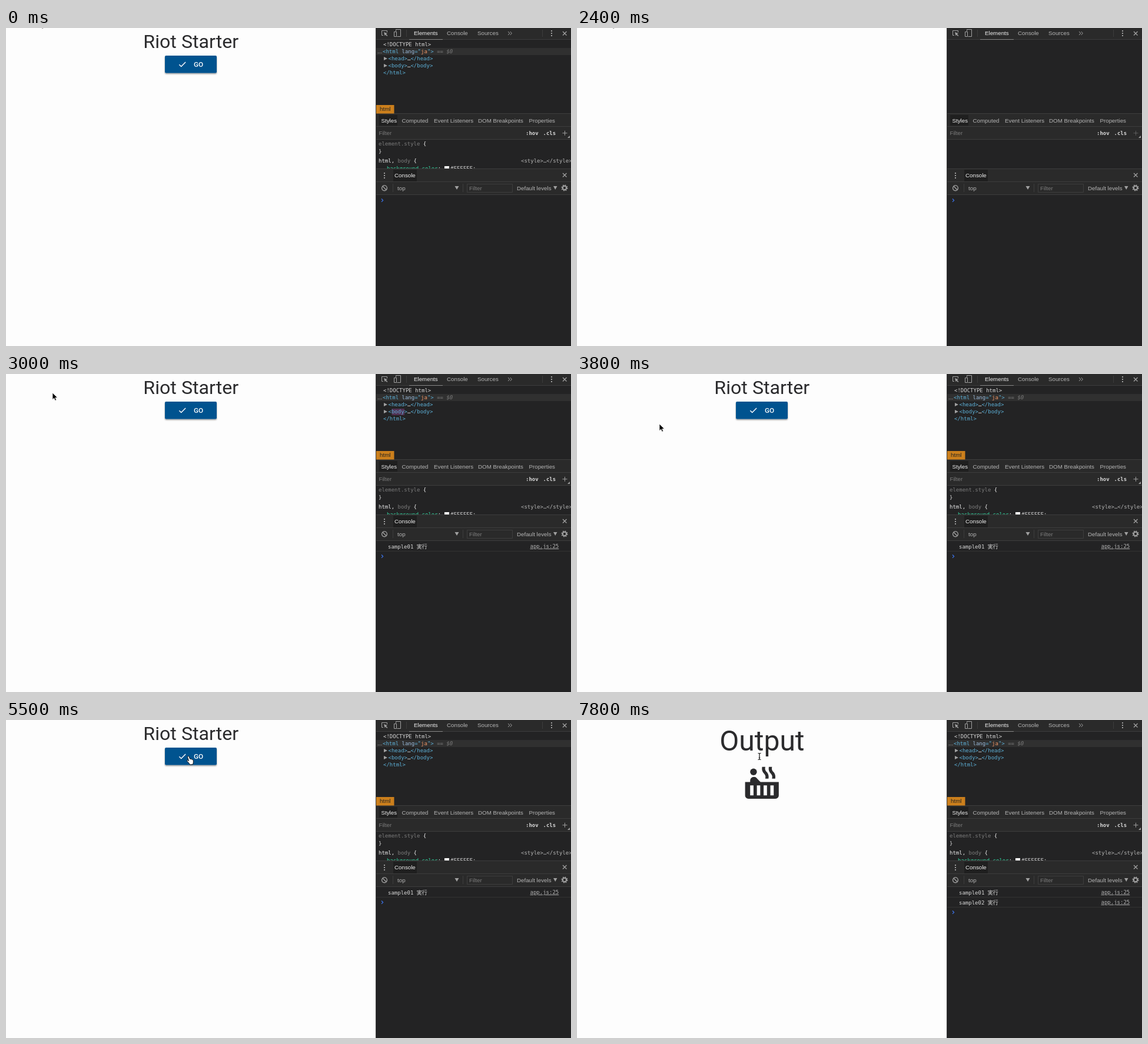
Animation, 960 px wide and 541 px high, one loop 8 s. Source, as an HTML page:

```html
<!DOCTYPE html>
<html lang="en">
<head>
<meta charset="utf-8">
<title>Riot Starter</title>
<style>
html, body { margin: 0; width: 100%; height: 100%; overflow: hidden; background: #fdfdfd; }
svg { display: block; width: 960px; height: 541px; }
text { white-space: pre; }
.title { font-family: Roboto, sans-serif; text-anchor: middle; }
.ui { font: 9.75px "Liberation Sans", Arial, sans-serif; fill: #b4b4b4; }
.code { font: 9px "DejaVu Sans Mono", "Noto Sans CJK JP", "Noto Sans CJK", monospace; fill: #d8d8d8; }
.on { fill: #eee; }
.dim { fill: #7c7c7c; }
.tag { fill: #5db0d7; }
.attr { fill: #9bbbdc; }
.val { fill: #f29766; }
.prop { fill: #35d4a0; }
.bold { font-weight: bold; }
.link { text-decoration: underline; fill: #b4b4b4; }
.line { stroke: #3d3d3d; fill: none; }
.icon { stroke: #a0a0a0; fill: none; }
.prompt { stroke: #3b6fe0; stroke-width: 1.3; fill: none; }
.arrow { fill: #a0a0a0; }
.bar { fill: #2a2a2a; }
.well { fill: #1f1f1f; }
.ink { fill: #2b2b2d; }
</style>
</head>
<body>
<svg viewBox="0 0 960 541">
  <defs>
    <clipPath id="buttonClip"><rect x="270" y="47" width="88" height="29.5" rx="2"/></clipPath>
    <clipPath id="stylesClip"><rect x="629" y="190" width="331" height="49"/></clipPath>
    <filter id="shadow" x="-20%" y="-30%" width="140%" height="190%">
      <feDropShadow dx="0" dy="1.5" stdDeviation="1.3" flood-color="#000" flood-opacity=".45"/>
    </filter>
  </defs>
  <rect width="960" height="541" fill="#fdfdfd"/>

  <g id="home">
    <text class="title ink" x="314.3" y="34" font-size="32.2">Riot Starter</text>
    <rect x="270" y="47" width="88" height="29.5" rx="2" fill="#02528f" filter="url(#shadow)"/>
    <g clip-path="url(#buttonClip)"><circle id="ripple" cx="311" cy="64" fill="#3069a4"/></g>
    <path d="M294.3 62.2l3.4 3.4 7.4-7.6" fill="none" stroke="#fff" stroke-width="1.4"/>
    <text x="319" y="66" font-family="Roboto, sans-serif" font-size="11.8" font-weight="500" fill="#fff">GO</text>
  </g>

  <g id="output" class="ink">
    <text class="title" x="314.4" y="52" font-size="48">Output</text>
    <g transform="translate(279.9 71.1) scale(2.86)">
      <circle cx="7" cy="6" r="2"/>
      <path fill-rule="evenodd" d="M11.15 12c-.31-.22-.59-.46-.82-.72l-1.4-1.55c-.4-.45-1-.73-1.68-.73C6.01 9 5 10.01 5 11.25V12H2v8c0 1.1.9 2 2 2h16c1.1 0 2-.9 2-2v-8zM5 14h2v6H5zm4 0h2v6H9zm4 0h2v6h-2zm4 0h2v6h-2z"/>
      <path id="steam" d="M18.65 5.86l-.07-.07c-.57-.62-.82-1.41-.67-2.2L18 3h-1.89l-.06.43c-.2 1.36.27 2.71 1.3 3.72l.07.06c.57.62.82 1.41.67 2.2l-.11.59h1.91l.06-.43c.21-1.36-.27-2.71-1.3-3.71z"/>
      <use href="#steam" x="-4"/>
    </g>
  </g>

  <!-- developer tools -->
  <rect x="629" width="331" height="541" fill="#232324"/>
  <path class="bar" d="M629 0h331v19H629zM629 146h331v43H629zM629 240h331v43H629z"/>
  <path class="well" d="M634 148h31v18h-31zM658 241h40v20h-40z"/>
  <path class="line" d="M628.5 0v541M629 19.5h331M629 145.5h331M629 167.5h331M629 189.5h331M629 239.5h331M629 261.5h331M629 283.5h331M680.5 3v12M911.5 3v12M657.5 265v14M776.5 265v14M783.5 265.5h77v14h-77z"/>
  <path d="M685 19.5h57" stroke="#888"/>

  <path class="icon" d="M641 12.5h-2.5v-8h9v3M659.5 6.5h4v8h-4zM662.5 5.5v-3h8v12h-6M853 6l2.8 3-2.8 3M856.6 6l2.8 3-2.8 3"/>
  <path class="arrow" d="M642 7l6 2.3-2.2 1 2.6 2.8-1 1-2.7-2.7-1 2z"/>
  <path class="icon" stroke-width="1.3" d="M946 6l6.5 6.5m0-6.5l-6.5 6.5M946 247l6.5 6.5m0-6.5l-6.5 6.5"/>
  <g class="arrow">
    <path d="M926 4h2v2h-2zm0 4h2v2h-2zm0 4h2v2h-2zM642 246h2v2h-2zm0 4h2v2h-2zm0 4h2v2h-2z"/>
    <path d="M762.5 269h7l-3.5 6zM930 269h6.5l-3.2 6zM958 183v4h-4z"/>
  </g>
  <circle class="icon" cx="643" cy="272.3" r="4.4" stroke-width="1.4"/>
  <path class="icon" stroke-width="1.4" d="M640 269.3l6 6"/>
  <circle class="icon" cx="949" cy="272" r="3.2" stroke-width="2"/>
  <circle class="icon" cx="949" cy="272" r="4.8" stroke-width="1.6" stroke-dasharray="1.9 1.87"/>
  <path id="plus" class="icon" d="M945.5 178.8h8M949.5 174.8v8"/>

  <g class="ui">
    <text class="on" x="693" y="12.3">Elements</text>
    <text x="749" y="12.3">Console</text>
    <text x="801" y="12.3">Sources</text>
    <text class="on" x="637.5" y="160.7">Styles</text>
    <text x="672.5" y="160.7">Computed</text>
    <text x="727" y="160.7">Event Listeners</text>
    <text x="802" y="160.7">DOM Breakpoints</text>
    <text x="888.5" y="160.7">Properties</text>
    <text class="dim" x="633.5" y="182.2">Filter</text>
    <text class="on" x="660" y="254.3">Console</text>
    <text x="665" y="275.5">top</text>
    <text class="dim" x="787" y="275.5">Filter</text>
    <text x="868" y="275.5">Default levels</text>
  </g>
  <text class="code bold" x="883" y="182">:hov</text>
  <text class="code bold" x="912.5" y="182">.cls</text>

  <g id="inspector" class="code">
    <rect x="629" y="34" width="331" height="12" fill="#303030"/>
    <rect id="flash" x="655.5" y="59" width="21.5" height="11" fill="#9a4a9c"/>
    <text x="641" y="31">&lt;!DOCTYPE html&gt;</text>
    <text class="ui" x="631" y="43">...</text>
    <text class="tag" x="640" y="43">&lt;html <tspan class="attr">lang</tspan>="<tspan class="val">ja</tspan>"&gt;<tspan class="dim" font-style="italic"> == $0</tspan></text>
    <text class="tag" x="649.5" y="55">&lt;head&gt;<tspan class="on">…</tspan>&lt;/head&gt;</text>
    <text class="tag" x="649.5" y="67">&lt;body&gt;<tspan class="on">…</tspan>&lt;/body&gt;</text>
    <text class="tag" x="641" y="79">&lt;/html&gt;</text>
    <path class="arrow" d="M642 49l6 3-6 3zM642 61l6 3-6 3z"/>
    <rect x="629" y="131" width="30.5" height="14.5" fill="#cb7f1c"/>
    <text class="ui" style="fill:#222" x="635" y="141.3">html</text>
    <g clip-path="url(#stylesClip)">
      <text class="dim" x="633" y="199.5">element.style <tspan class="on">{</tspan></text>
      <text x="633" y="212.5">}</text>
      <text class="on" x="633" y="229">html, <tspan class="dim">body</tspan> {</text>
      <text x="875" y="229" style="fill:#b4b4b4">&lt;style&gt;…&lt;/style&gt;</text>
      <text class="prop" x="647" y="241.5">background-color<tspan class="on">:</tspan></text>
      <rect x="745" y="235" width="8" height="8" fill="#fff"/>
      <text x="755" y="241.5">#FFFFFF;</text>
    </g>
  </g>

  <g id="log1" class="code">
    <text x="649" y="297">sample01 実行</text>
    <text class="link" x="890.5" y="296">app.js:25</text>
    <path class="line" opacity=".6" d="M629 301.5h331"/>
  </g>
  <g id="log2" class="code">
    <text x="649" y="314">sample02 実行</text>
    <text class="link" x="890.5" y="313">app.js:25</text>
    <path class="line" opacity=".6" d="M629 318.5h331"/>
  </g>
  <path id="prompt" class="prompt" d="M638 290.5l2.6 2.7-2.6 2.7"/>

  <!-- pointers, each with its hot spot at 0,0 -->
  <path id="pointer" d="M0 0v11.5l2.7-2.5 1.8 4.2 2-.9-1.8-4h3.7z" fill="#000" stroke="#fff" stroke-width=".7"/>
  <path id="hand" d="M-1.5 1.2Q-1.7-.3-.3-.4 .9-.4 1.3 .9L2.6 4.4Q3.9 3.6 4.6 4.8 6 4.2 6.5 5.5 8 5.2 8.3 6.9 8.7 10 7.6 13.6L2.6 14Q.6 10.5-2.4 7.9-2.9 6.6-1.6 6.4-.3 6.6 .6 7.6z" fill="#fff" stroke="#111" stroke-width="1"/>
  <path id="beam" d="M-2.5-5.5q2 0 2.5 1 .5-1 2.5-1M0-4.5v9M-2.5 5.5q2 0 2.5-1 .5 1 2.5 1M-1.2 2h2.4" fill="none" stroke="#111" stroke-width="1.2"/>
</svg>
<script>
const LOOP = 8000, STEP = 100;
const CLEAR = 2200, BLANK = 2300, PAINT = 2500, INSPECT = 2600, LOG = 2700;
const PRESS = 7050, SWAP = 7300, SETTLED = 7400;
// time, x, y of the pointer's hot spot
const path = [
  [0, 57, -12], [2500, 57, -12], [2900, 77, 21], [3000, 79, 32],
  [3800, 140, 85], [4600, 300, 125], [4700, 300, 125], [5300, 310, 62]
];
const el = id => document.getElementById(id);
const show = (id, on) => el(id).style.display = on ? "" : "none";

function pointerAt(t) {
  const i = path.findIndex(p => p[0] > t);
  if (i < 0) return path[path.length - 1].slice(1);
  const [t0, x0, y0] = path[i - 1], [t1, x1, y1] = path[i];
  const k = (t - t0) / (t1 - t0);
  return [x0 + (x1 - x0) * k, y0 + (y1 - y0) * k];
}

function draw(t) {
  const swapped = t >= SWAP, settled = t >= SETTLED;
  const inspecting = t < CLEAR || t >= INSPECT;
  const logs = settled ? 2 : t >= LOG ? 1 : 0;
  show("home", !swapped && (t < BLANK || t >= PAINT));
  show("output", swapped);
  show("inspector", inspecting);
  el("plus").style.opacity = inspecting ? 1 : .4;
  show("log1", logs > 0);
  show("log2", logs > 1);
  el("prompt").setAttribute("transform", `translate(0 ${logs * 17})`);
  el("flash").style.opacity = t < LOG ? 0 : Math.max(0, .8 - (t - LOG) / 750);
  el("ripple").setAttribute("r", t > PRESS ? 26 + (t - PRESS) * .09 : 0);

  const [x, y] = pointerAt(t);
  const overButton = x > 270 && x < 358 && y > 47 && y < 76;
  const shape = settled ? "beam" : overButton ? "hand" : "pointer";
  for (const id of ["pointer", "hand", "beam"]) show(id, id === shape);
  el(shape).setAttribute("transform", `translate(${x} ${y})`);
}

function tick() {
  draw(Math.floor(performance.now() % LOOP / STEP) * STEP);
  requestAnimationFrame(tick);
}
tick();
</script>
</body>
</html>
```
